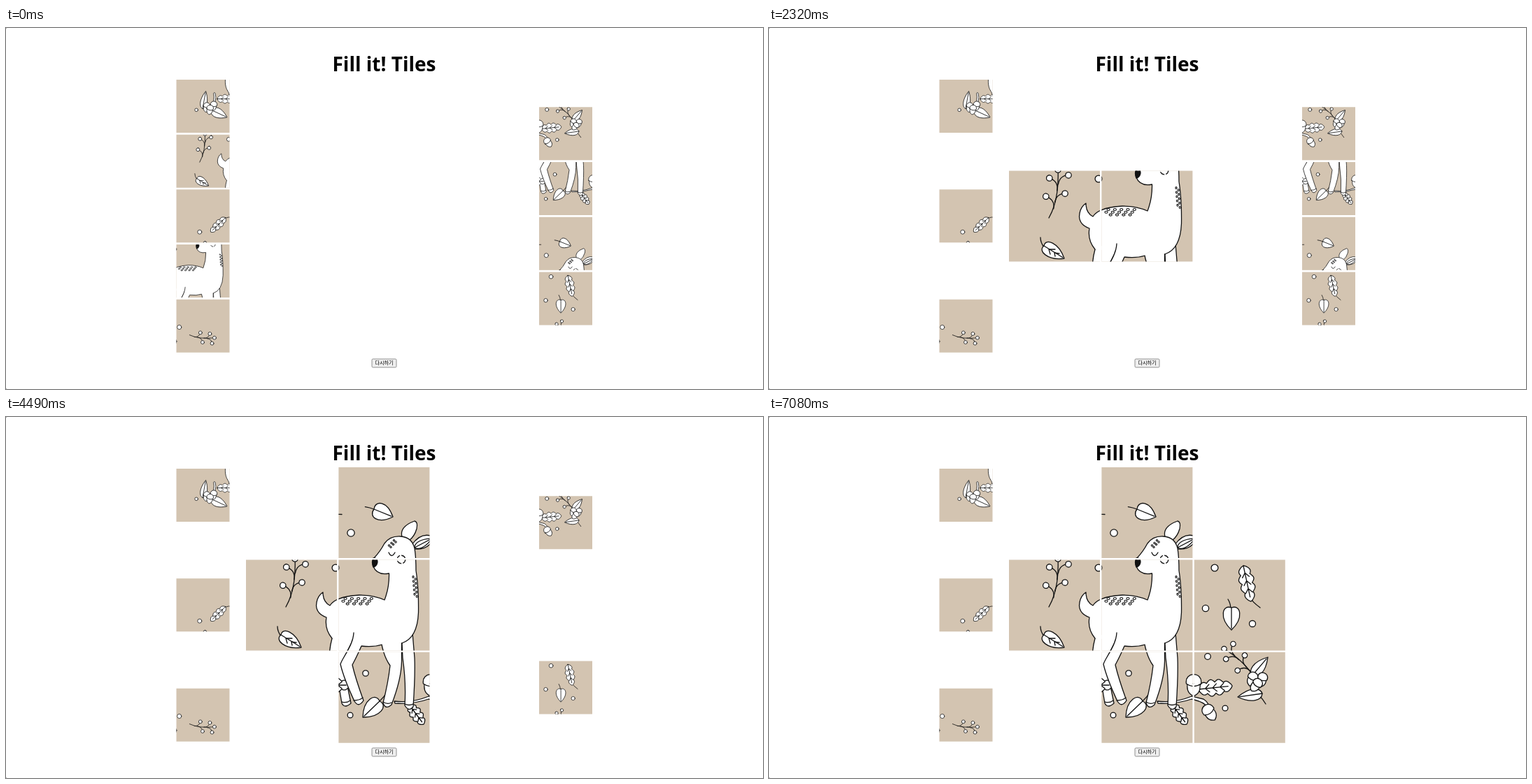
An HTML page that plays this animation: 1082x517 px, repeating every 8 s.

```html
<!DOCTYPE html>
<html lang="ko">
<head>
<meta charset="utf-8">
<title>Fill it! Tiles</title>
<style>
html, body { margin: 0; width: 100%; height: 100%; overflow: hidden; background: #fff; }
#stage { display: block; width: 1082px; height: 517px; }
#art { fill: #fff; stroke: #111; stroke-width: 1.3; stroke-linecap: round; stroke-linejoin: round; }
.line { fill: none; }
.title { font: 700 28px "Noto Sans", "Open Sans", sans-serif; }
.label { font: 7.1px "Noto Sans CJK KR", "Noto Sans CJK", sans-serif; }
#ghost { filter: drop-shadow(0 3px 4px rgba(0, 0, 0, .3)); }
</style>
</head>
<body>
<svg id="stage" viewBox="0 0 1082 517">
  <defs><g id="art"></g></defs>
  <path d="M0 0h1.5L0 1.5zM0 517h1.5L0 515.5z" fill="#aaa"/>
  <text class="title" x="540.5" y="62" text-anchor="middle">Fill it! Tiles</text>
  <rect x="523" y="474" width="35" height="12" rx="1.5" fill="#efefef" stroke="#767676" stroke-width=".8"/>
  <text class="label" x="540.5" y="482.3" text-anchor="middle">다시하기</text>
  <g id="tiles"></g>
  <g id="bands" fill="#f5f5f5"></g>
  <g id="ghost" opacity="0"></g>
</svg>
<script>
const $ = id => document.getElementById(id);
const CELL = 130, SMALL = 76, PITCH = 132.4, TRAY_PITCH = 78.7;
const cellX = c => 343 + c * PITCH;
const cellY = r => 72 + r * PITCH;
const times = (n, f) => Array.from({ length: n }, (_, i) => f(i)).join('');

// Basic shapes
const path = (d, cls = '') => `<path class="${cls}" d="${d}"/>`;
const line = d => path(d, 'line');
const oval = (x, y, rx, ry = rx) => `<ellipse cx="${x}" cy="${y}" rx="${rx}" ry="${ry}"/>`;
const turn = (x, y, deg, body) => `<g transform="translate(${x} ${y}) rotate(${deg})">${body}</g>`;
const along = (x1, y1, x2, y2, shape) =>
  turn(x1, y1, Math.atan2(y2 - y1, x2 - x1) * 180 / Math.PI, shape(Math.hypot(x2 - x1, y2 - y1)));

// Leaf from base to tip; a negative "back" makes a round base
const leaf = (x1, y1, x2, y2, w, back = -.12, stem = 0) => along(x1, y1, x2, y2, l =>
  path(`M0 0C${back * l} ${-w} ${l * .45} ${-w * 1.4} ${l} 0C${l * .45} ${w * 1.4} ${back * l} ${w} 0 0`) +
  line(`M${-stem} ${stem * .12}Q${-stem / 2} 0 0 0H${l * .92}`));

// Oak leaf: four lobes a side under a rounded envelope
const oak = (x1, y1, x2, y2, w) => along(x1, y1, x2, y2, l => {
  const edge = side => times(41, i => {
    const u = side > 0 ? i / 40 : 1 - i / 40;
    const h = Math.sqrt(Math.abs(Math.sin(Math.PI * u ** .85))) * (.66 + .34 * Math.abs(Math.sin(4 * Math.PI * u)));
    return `L${(u * l).toFixed(1)} ${(side * h * w).toFixed(1)}`;
  });
  const veins = times(3, i => `M${l * (.2 + i * .22)} 0l${l * .12} ${-w * .45}m${-l * .12} ${w * .45}l${l * .12} ${w * .45}`);
  return path('M0 0' + edge(1) + edge(-1) + 'Z') + line(`M0 0H${l * .88}` + veins);
});

// Sprig: a stem with berries on alternating sides and one at the tip
const sprig = (x1, y1, x2, y2, r = 4.2) => along(x1, y1, x2, y2, l => {
  const berry = i => [l * (.42 + .38 * (i >> 1) + .13 * (i & 1)), l * (i & 1 ? .23 : -.14)];
  return line(`M0 0Q${l * .4} ${l * .14} ${l} 0`) +
    times(4, i => {
      const [u, v] = berry(i);
      return line(`M${u - l * .22} ${l * .06}Q${u - l * .03} ${l * .06} ${u} ${v}`) + oval(u, v, r);
    }) + oval(l, 0, r);
});

// Acorn with its cap towards -y
const acorn = (x, y, deg, s) => turn(x, y, deg,
  path(`M${-s * .85} 0C${-s} ${s * 1.2} ${-s * .4} ${s * 1.5} 0 ${s * 1.7}C${s * .4} ${s * 1.5} ${s} ${s * 1.2} ${s * .85} 0Z`) +
  path(`M${-s} 0C${-s * 1.3} ${-s * 1.7} ${s * 1.3} ${-s * 1.7} ${s} 0Q0 ${s * .7} ${-s} 0Z`));

function scenery() {
  const rings = [[400, 176], [471, 216], [493, 166], [615, 140], [637, 216], [624, 274],
    [691, 296], [514, 367], [492, 427], [627, 343], [652, 417], [392, 411]];
  return rings.map(([x, y]) => oval(x, y, 6 - y * .005)).join('') +
    sprig(400, 272, 413, 203) + sprig(640, 159, 701, 166) + sprig(694, 375, 650.5, 332, 3.7) +
    // top row
    line('M462 142Q469 139 480 139.5') + oak(463, 141, 427, 176, 10) +
    leaf(526, 132, 553, 143, 13, -.12, 13) +
    // middle row
    line('M388 300Q388 307 393 314') + leaf(393, 312, 422, 330, 11) +
    line('M400 317l2 7m-2-7l9 0m-1 5l1 5m-1-5l7 1') +
    line('M687 258Q691 265 702 273') + oak(678, 213, 689, 264, 11) +
    line('M656 261Q660 267 660 276') + leaf(661, 273, 661, 305, 13, -.15) +
    // bottom right
    line('M690 388Q702 398 710 411') + leaf(690, 371, 713, 344, 9, .1) + leaf(705, 396, 670, 401, 9, .05) +
    acorn(705, 375, 15, 7) + acorn(691, 374, 20, 7) + acorn(697, 383, 40, 7) +
    path('M555 407Q580 410 604 400L621 404Q627 408 629 414L626 415Q622 408 604 404Q580 412 556 410Z') +
    oak(614, 390, 662, 385, 12) + acorn(607, 382, 0, 10.5) + acorn(629, 422, -35, 8.5) +
    // bottom middle
    leaf(534, 407, 510, 430, 13, -.15, 17) + oak(577, 413, 597, 440, 9) +
    // bottom left
    path('M434 390Q436 378 434 370Q436 367 438 370Q441 380 438 391Z') +
    leaf(407, 408, 415, 365, 9, .05) + leaf(428, 411, 467, 429, 13, .05) +
    acorn(434, 400, 10, 8) + acorn(417, 403, 10, 8) + acorn(425, 409, 10, 8);
}

// Rows of spots on back, neck and forehead
const spots = () => '<g stroke-width="1.1">' +
  times(14, i => oval(482 + i * 3.1, 260 + (i * 2 + 1) % 3 * 3.8, 2.1, 1.5)) +
  times(10, i => oval(582 + i % 2 * 3 + i * .25, 229 + i * 3.1, 1.1, 1.4)) +
  times(6, i => oval(547.5 + i % 3 * 3.5 + (i > 2) * 2.5, 184 - i % 3 * 3.6 + (i > 2) * 2.2, 1.2)) + '</g>';

const deer = () =>
  // far legs
  path('M466 317C463 328 460 346 466 360C472 370 474 376 476 386L480 410Q484 418 493 410L489 390L479 353L494 323L500 300') +
  line('M480 408Q487 410 492 406') + oak(443, 384, 492, 384, 11) +
  path('M566 324L567 345Q572 380 570 413Q576 423 582 415Q585 370 584 345L581 309') +
  line('M570 411Q576 414 582 411') +
  // ears
  path('M584 189Q598 190 605 183Q611 176 607 170Q592 166 580 183') + leaf(584, 187, 609, 174, 5.5, .1) +
  path('M566 172Q562 157 584 149Q589 150 587 160Q584 171 576 177') +
  // body and head
  path('M466 317Q455 304 458 287Q444 282 443.5 270Q444 257 453 251Q453 265 463 270Q471 257 505 255Q526 255 541 262' +
    'Q548 244 547.5 224Q530 227 525 214L525 203Q534 194 541 181Q549 170 564 171Q580 172 584 188' +
    'Q586 200 586 220Q590 245 589.5 280Q588 317 565.5 324') +
  '<path fill="#111" d="M525 202Q531 201 531 208Q530 214 525 215Q522 208 525 202Z"/>' +
  line('M547 194Q551 203 556 194') +
  '<circle class="line" cx="565" cy="204" r="5.8" stroke-dasharray="6 3.1"/>' +
  // near legs and belly
  path('M497 309C496 328 481 344 478 354Q483 375 498 407Q504 417 511 406Q500 376 495 355Q501 344 508 328Q525 330 537 326' +
    'Q541 345 549 356Q546 382 539 409Q542 420 551 412Q565 376 565.5 350L565.5 324') +
  line('M497 406Q505 406 510 402M539 408Q545 412 551 409') + spots();

$('art').innerHTML = '<rect x="300" y="50" width="480" height="450" fill="#d3c4b1" stroke="none"/>' + scenery() + deer();

// Each tray is a centred column of pieces, named by column and row
const tray = (x, names) => names.split(' ').map((name, i, all) => ({
  name, x, y: 270.7 + (i - all.length / 2) * TRAY_PITCH, cx: cellX(+name[0]), cy: cellY(+name[1])
}));
const pieces = [...tray(243.5, '02 01 00 11 20'), ...tray(762, '22 12 10 21')];
const view = p =>
  `<svg width="${SMALL}" height="${SMALL}" viewBox="${p.cx} ${p.cy} ${CELL} ${CELL}"><use href="#art"/></svg>`;

$('tiles').innerHTML = pieces.map(view).join('');
pieces.forEach((p, i) => { p.node = $('tiles').children[i]; });

// A drag follows its key points [time, x, y], then heads for the middle of its cell
const STEP = 70;
function drag(name, drop, ...way) {
  const p = pieces.find(p => p.name === name), mid = (CELL - SMALL) / 2;
  p.drop = drop;
  return { p, drop, start: way[0][0], way: [...way, [drop, p.cx + mid, p.cy + mid]] };
}
const drags = [
  drag('11', 1060, [500, 429, 234], [920, 487, 246], [1059, 487, 246]),
  drag('01', 2320, [1760, 276, 170.5], [1970, 354, 210], [2110, 354, 210]),
  drag('12', 3510, [3020, 735, 214], [3300, 513, 329.5]),
  drag('10', 4490, [4000, 740, 262]),
  drag('21', 5470, [5120, 742, 333]),
  drag('22', 7080, [6100, 752, 125], [6310, 706, 315], [6380, 706, 315])
];

function place(way, t) {
  const i = way.findIndex(k => k[0] > t), a = way[i - 1], b = way[i];
  const f = (t - a[0]) / (b[0] - a[0]);
  return [a[1] + (b[1] - a[1]) * f, a[2] + (b[2] - a[2]) * f];
}

const setAll = (node, attrs) => Object.entries(attrs).forEach(([k, v]) => node.setAttribute(k, v));
const ghost = $('ghost'), GAP = 23.5;

// Faint column where the drag shadow crosses the gap beside a tray
const band = (left, x, y) => x < left + GAP && x + SMALL > left
  ? `<rect x="${left}" y="${y - 10.5}" width="${GAP}" height="99"/>` : '';

let held;
function draw(time) {
  const t = Math.floor((time - 10) / STEP) * STEP + 10;
  for (const p of pieces) {
    const done = t >= p.drop, size = done ? CELL : SMALL;
    setAll(p.node, { x: done ? p.cx : p.x, y: done ? p.cy : p.y, width: size, height: size });
  }

  const d = drags.find(d => t >= d.start && t < d.drop);
  ghost.setAttribute('opacity', d ? .95 : 0);
  $('bands').innerHTML = '';
  if (!d) return;
  if (held !== d.p) {
    held = d.p;
    ghost.innerHTML = view(held) + `<rect width="${SMALL}" height="${SMALL}" fill="#0a1014" opacity=".23"/>`;
  }
  const [x, y] = place(d.way, t);
  ghost.setAttribute('transform', `translate(${x} ${y})`);
  $('bands').innerHTML = band(319.5, x, y) + band(738.5, x, y);
}

const begin = performance.now();
function tick() {
  draw((performance.now() - begin) % 8000);
  requestAnimationFrame(tick);
}
tick();
</script>
</body>
</html>
```
